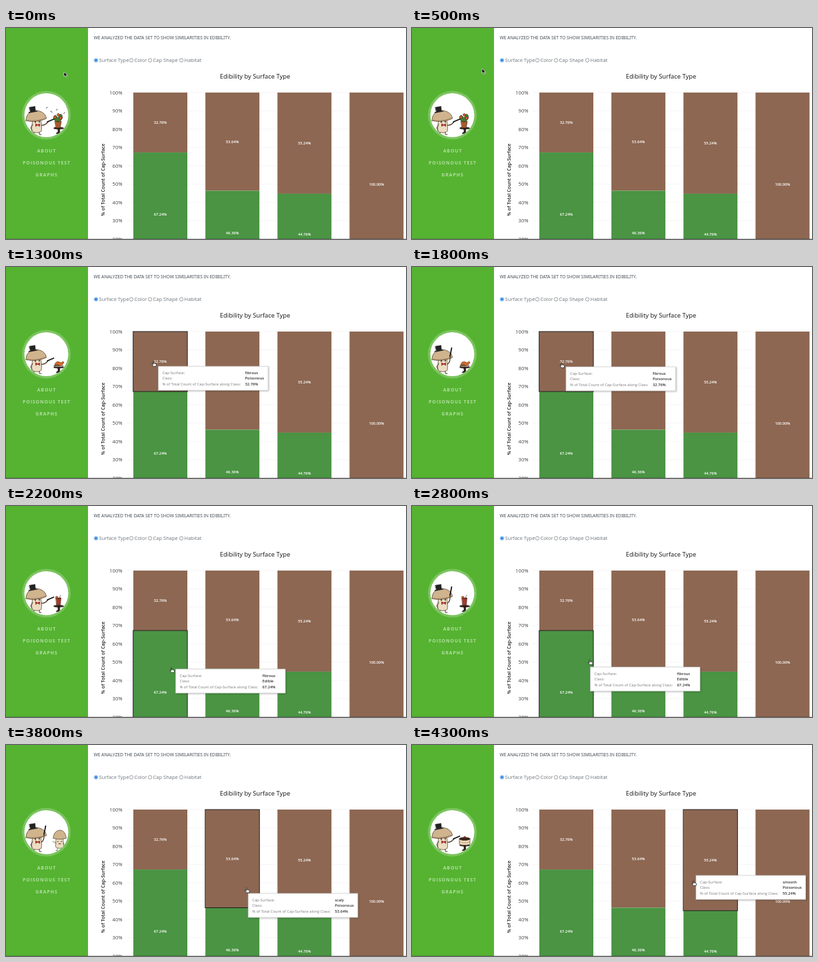
Write an HTML page that moves like this. It is 600 px wide and 317 px high and loops after 4.4 s.

```html
<!DOCTYPE html>
<html lang="en">
<head>
<meta charset="utf-8">
<title>Edibility chart</title>
<style>
  html, body { margin: 0; width: 100%; height: 100%; overflow: hidden; background: #fff; }
  svg { display: block; width: 600px; height: 317px; font-family: "Open Sans", "Noto Sans", sans-serif; }
  #headline { font-family: "Noto Sans", "Open Sans", sans-serif; font-stretch: 62.5%; font-weight: 500; fill: #495057; letter-spacing: -.1px; }
  .menu { font-size: 6.8px; font-weight: 700; letter-spacing: 1px; fill: #b3dfa2; text-anchor: middle; }
  .radio { font-size: 7.5px; fill: #6c757d; }
  .axis { font-size: 7.7px; fill: #444; text-anchor: end; }
  .value { font-size: 5.7px; font-weight: 600; fill: #fff; text-anchor: middle; }
  #tip text { font-size: 5.75px; fill: #787878; }
  #tip .val { font-weight: 600; fill: #333; }
</style>
</head>
<body>
<svg viewBox="0 0 600 317">
  <defs>
    <clipPath id="disc"><circle cx="60.5" cy="131" r="33"/></clipPath>
    <filter id="shade" x="-10%" y="-20%" width="120%" height="150%">
      <feDropShadow dx="1" dy="1" stdDeviation="1" flood-opacity=".3"/>
    </filter>
  </defs>
  <rect width="600" height="317" fill="#fff"/>
  <text id="headline" x="131.5" y="17.2" font-size="12.6">WE ANALYZED THE DATA SET TO SHOW SIMILARITIES IN EDIBILITY.</text>
  <g id="radios"></g>
  <text x="373.5" y="76.4" font-size="9.4" text-anchor="middle" fill="#111">Edibility by Surface Type</text>
  <text transform="translate(148.4 228) rotate(-90)" font-size="7.2" font-weight="600" text-anchor="middle" fill="#222">% of Total Count of Cap-Surface</text>
  <g id="chart"></g>

  <rect width="123" height="317" fill="#55b331"/>
  <circle cx="60.5" cy="131" r="36.5" fill="#7bc45e"/>
  <circle cx="60.5" cy="131" r="33" fill="#fff"/>
  <g clip-path="url(#disc)" stroke-linecap="round" stroke-linejoin="round">
    <g id="table" fill="#2b1d1a" stroke="#2b1d1a" stroke-width=".8">
      <ellipse cx="79" cy="150.5" rx="7.5" ry="1.5"/>
      <path d="M78 151h2.4v5l3 2.5h-8.4l3-2.5z"/>
    </g>
    <g id="items" stroke="#3a2418" stroke-width=".6">
      <g>
        <path d="M73.5 140h9.5l-1.6 10h-6.3z" fill="#a85a2a"/>
        <path d="M78 141c-8-1-8-9-4-10l4 4 4-6c4 2 4 10-4 12z" fill="#3f7d35"/>
        <g fill="#e8622c"><circle cx="73.5" cy="134" r="2"/><circle cx="78.5" cy="130.5" r="2"/><circle cx="82" cy="135.5" r="2"/></g>
      </g>
      <g>
        <path d="M72 148h14l-2 2h-10z" fill="#eee4d5"/>
        <path d="M73 148c0-6 6-7 9-4l4-2 .8 2-3.8 4z" fill="#e2692a"/>
        <path d="M74 148l3-2 3 2z" fill="#5b9a3c"/>
      </g>
      <g>
        <path d="M75 138h7.5l-1 11h-5.5z" fill="#a33b2a"/>
        <path d="M75 139h7.5M80 138l2-4" fill="none"/>
        <circle cx="76" cy="137" r="1.5" fill="#e58a37"/>
      </g>
      <g>
        <path d="M75.5 139h10l1 14c-1 3-11 3-12 0z" fill="#ecdcc2"/>
        <path d="M71 140c0-8 5-12 10-12s9 5 9.300 12c-6 2-14 2-19.300 0z" fill="#cfb48d"/>
        <path d="M77 155.500v3h-2M84 155.500v3h2M75 147l-5-2M86 147l2 5" fill="none"/>
        <path d="M78 144.500v1M83 144.500v1M79 148.500q1.500-1 3 0" fill="none" stroke-width="1"/>
      </g>
      <g>
        <path d="M71 141v8c4 2 12 2 16 0v-8z" fill="#f0dfbd"/>
        <ellipse cx="79" cy="141" rx="8" ry="2.300" fill="#3a241c"/>
        <path d="M71 145.500c4 2 12 2 16 0" fill="none" stroke="#8a5a3a"/>
        <circle cx="79" cy="138.500" r="1.300" fill="#c2372b"/>
      </g>
    </g>
    <g id="sparks" stroke="#333" stroke-width="1"></g>
    <g stroke="#4a3424" stroke-width=".7">
      <path d="M40 137c-1 9-2 14-1 18 3 3 11 3 14 0 1-5 0-12-1-18z" fill="#ecdcc2"/>
      <path d="M42 157v3h-3M50 157v3h3M40 145l-3 5 2 4" fill="none" stroke-width="1"/>
      <path d="M30 139c0-9 6-15 14-15 9 0 16 5 16.500 12-8 4-22 6-30.500 3z" fill="#cfb48d"/>
      <path d="M32 138.500c8 2 20 0 27-3" fill="none" stroke="#8d6c4c"/>
      <g transform="rotate(-10 40 124)" fill="#222" stroke="#222">
        <path d="M36 118.500h8.500l-.5 7h-7.500z"/><path d="M34 126h12.500" stroke-width="1.400"/>
      </g>
      <path d="M44 140.500v1.500M50 140v1.500" stroke="#111" stroke-width="1.300"/>
      <path d="M47.500 145.500l-3-1.500v3.500zl3-1.500v3.500z" fill="#b92d25" stroke="#7a1c18"/>
    </g>
    <g fill="none">
      <g id="point"><path d="M53 146q5 1 10-5" stroke="#4a3424" stroke-width="1.200"/><path d="M62 141l9.500-4" stroke="#111" stroke-width="1.700"/></g>
      <g id="raise"><path d="M53 146q5-3 4-12" stroke="#4a3424" stroke-width="1.200"/><path d="M57 134l2.500-12.500" stroke="#111" stroke-width="1.700"/></g>
      <path id="reach" d="M53 146q6-6 18-6" stroke="#4a3424" stroke-width="1.300"/>
    </g>
  </g>
  <text class="menu" x="61" y="186.500">ABOUT</text>
  <text class="menu" x="61" y="204.600">POISONOUS TEST</text>
  <text class="menu" x="61" y="222.700">GRAPHS</text>
  <rect y="316.300" width="600" height=".7" fill="#000" opacity=".25"/>

  <rect id="ring" fill="none" stroke="#1d1d1d"/>
  <g id="tip">
    <rect width="164.500" height="36" fill="#fff" stroke="#c8c8c8" stroke-width=".7" filter="url(#shade)"/>
    <text x="6" y="12">Cap-Surface:</text>
    <text x="6" y="20.200">Class:</text>
    <text x="6" y="28.500">% of Total Count of Cap-Surface along Class:</text>
    <text class="val" x="130" y="12"></text>
    <text class="val" x="130" y="20.200"></text>
    <text class="val" x="130" y="28.500"></text>
  </g>
  <path id="arrow" d="M0 0v7l1.700-1.500 1.200 2.600 1.300-.6-1.200-2.500h2.300z" fill="#000" stroke="#fff" stroke-width=".6"/>
  <path id="hand" d="M-1.500 1v-4.200q-.8-1 .2-1.100 .9 0 .9 1v2.100l3.200.6q.9.300.8 1.300l-.5 2.600h-3.900l-2.700-3q0-.9.900-.6z" transform="" fill="#fff" stroke="#222" stroke-width=".8"/>
</svg>
<script>
const LOOP = 4400, TOP = 97, FULL = 275, BAR_W = 81;
const BROWN = '#8d6752', GREEN = '#4a9443';
const $ = id => document.getElementById(id);

function add(parent, tag, attrs, text) {
  const node = document.createElementNS('http://www.w3.org/2000/svg', tag);
  for (const key in attrs) node.setAttribute(key, attrs[key]);
  if (text) node.textContent = text;
  return parent.appendChild(node);
}
const show = (node, on) => { node.style.display = on ? '' : 'none'; };
const place = (node, [x, y]) => node.setAttribute('transform', `translate(${x} ${y})`);

// Shrink the headline's type size to its column.
const headline = $('headline');
const fitHeadline = () => {
  headline.setAttribute('font-size', 12.6);
  const w = headline.getComputedTextLength();
  if (w > 208.5) headline.setAttribute('font-size', 12.6 * 208.5 / w);
};
fitHeadline();

[['Surface Type', 135], ['Color', 188], ['Cap Shape', 216], ['Habitat', 263]].forEach(([name, x], i) => {
  const color = i ? '#777' : '#1674e0';
  add($('radios'), 'circle', { cx: x, cy: 48.5, r: 2.7, fill: '#fff', stroke: color, 'stroke-width': .7 });
  if (!i) add($('radios'), 'circle', { cx: x, cy: 48.5, r: 1.7, fill: color });
  add($('radios'), 'text', { x: x + 4.6, y: 51.3, class: 'radio' }, name);
});

const chart = $('chart');
for (let i = 0; i <= 8; i++) {
  const y = TOP + i * FULL / 10;
  add(chart, 'path', { d: `M181 ${y}H600`, stroke: '#f2f2f2', 'stroke-width': .7 });
  add(chart, 'text', { x: 174.7, y: y + 2.8, class: 'axis' }, 100 - i * 10 + '%');
}

const segments = [];
[['fibrous', 32.76], ['scaly', 53.64], ['smooth', 55.24], ['', 100]].forEach(([surface, bad], i) => {
  const x = 191 + i * 108.1;
  const stack = (kind, share, y, fill) => {
    const h = share / 100 * FULL, label = share.toFixed(2) + '%';
    add(chart, 'rect', { x, y, width: BAR_W, height: h, fill });
    add(chart, 'text', { x: x + BAR_W / 2, y: y + h / 2 + 2, class: 'value' }, label);
    segments.push({ x, y, h, rows: [surface, kind, label] });
  };
  stack('Poisonous', bad, TOP, BROWN);
  if (bad < 100) stack('Edible', 100 - bad, TOP + bad / 100 * FULL, GREEN);
});

[[62, 119], [67, 125], [77, 122], [91, 119], [88, 127]].forEach(([x, y], i) =>
  add($('sparks'), 'path', { d: `M${x} ${y}l${i % 2 ? 2 : -1.5} 1.5` }));

// Time, x, y
const pointerPath = [
  [200, 87, 66], [500, 105, 61], [900, 151, 98], [1300, 222, 146], [1800, 225, 148],
  [1900, 226, 153], [2200, 249, 247], [2500, 256, 243], [2800, 267.5, 235], [3100, 305, 224],
  [3400, 334, 221], [3700, 345, 222], [4000, 395, 212], [4300, 423, 208]
];
const tipPath = [
  [1200, 228, 149], [1800, 231, 150], [1900, 232, 155], [2200, 254.5, 245], [2500, 262, 247],
  [2800, 267.5, 242], [3100, 311, 228], [3400, 340.5, 225], [3700, 351, 226], [4100, 400, 214], [4300, 426, 196]
];
const itemStarts = [0, 800, 2000, 3000, 4000];
const raises = [[600, 800], [1500, 2000], [2600, 3000], [3600, 4000]];

function along(path, t) {
  const i = path.findIndex(p => p[0] >= t);
  if (i < 0) return path[path.length - 1].slice(1);
  if (!i) return path[0].slice(1);
  const [t0, x0, y0] = path[i - 1], [t1, x1, y1] = path[i];
  const k = (t - t0) / (t1 - t0);
  return [x0 + (x1 - x0) * k, y0 + (y1 - y0) * k];
}

const items = [...$('items').children];
const values = [...document.querySelectorAll('.val')];

function drawMagician(t) {
  const now = itemStarts.filter(s => s <= t).length - 1;
  const age = t - itemStarts[now];
  const up = raises.some(([a, b]) => t >= a && t < b);
  items.forEach((item, i) => show(item, i === now));
  const grow = now === 1 && age < 200 ? 1.25 : 1;
  items[now].setAttribute('transform', `translate(79 150) scale(${grow}) translate(-79 -150)`);
  show($('table'), now !== 3);
  show($('sparks'), age < 100);
  show($('raise'), up);
  show($('reach'), !up && now === 3);
  show($('point'), !up && now !== 3);
}

function drawPointer(t) {
  const at = along(pointerPath, t), [x, y] = at;
  const overChart = x > 140;
  show($('arrow'), !overChart);
  show($('hand'), overChart);
  place(overChart ? $('hand') : $('arrow'), at);

  const hit = segments.find(s => x >= s.x && x <= s.x + BAR_W && y >= s.y && y < s.y + s.h);
  show($('ring'), hit);
  show($('tip'), hit);
  if (!hit) return;
  const box = { x: hit.x - .3, y: hit.y, width: BAR_W + .4, height: hit.h };
  for (const key in box) $('ring').setAttribute(key, box[key]);
  place($('tip'), along(tipPath, t));
  values.forEach((node, i) => { node.textContent = hit.rows[i]; });
}

function draw(time) {
  const step = Math.floor(time % LOOP / 100) * 100;
  const t = step < 200 ? 0 : step;
  drawMagician(t);
  drawPointer(t);
}

const start = performance.now();
function tick() {
  draw(performance.now() - start);
  requestAnimationFrame(tick);
}
draw(0);
requestAnimationFrame(tick);
</script>
</body>
</html>
```
